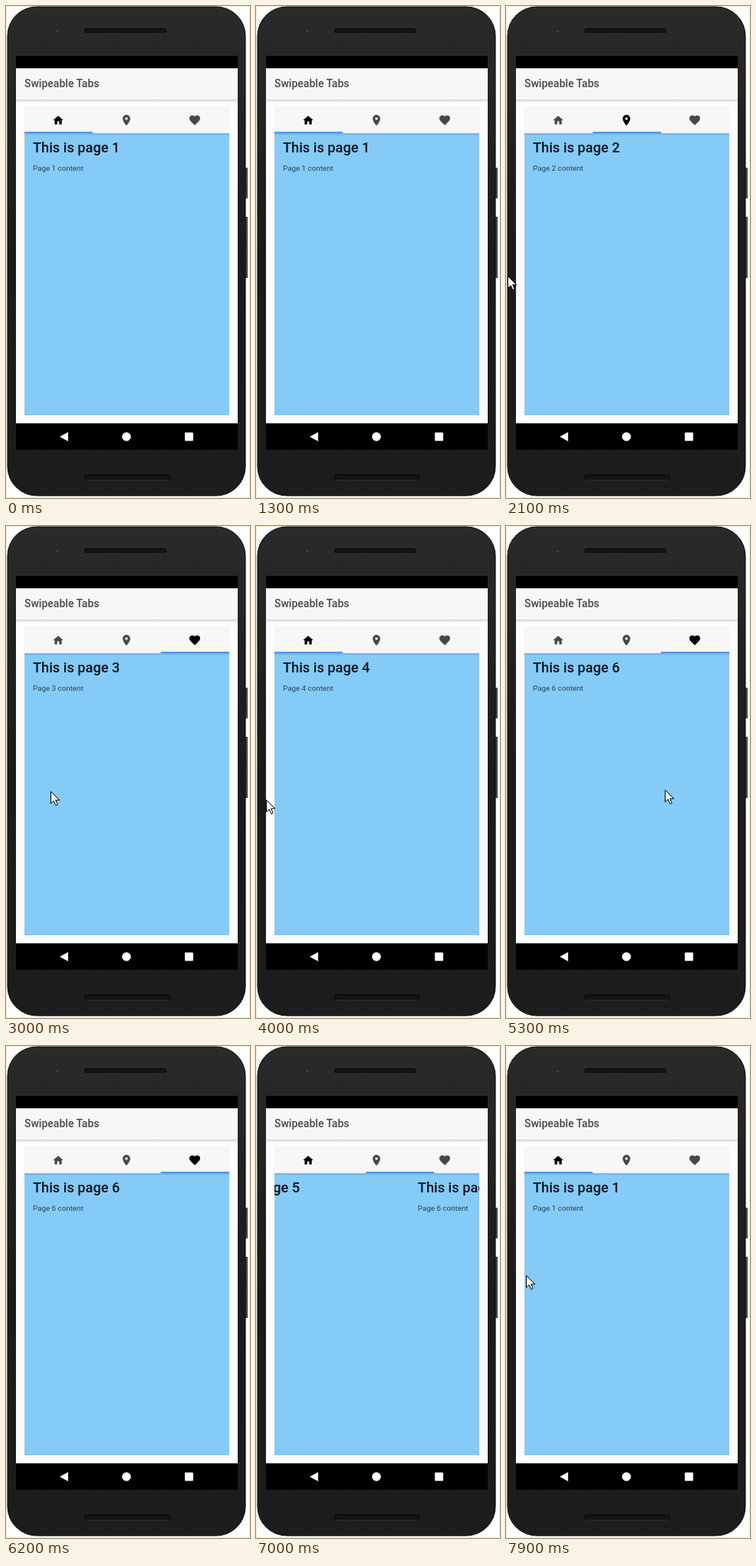
An HTML page for the animation above (8000 ms loop, 318 by 642 pixels).

```html
<!DOCTYPE html>
<html lang="en">
<head>
<meta charset="utf-8">
<title>Swipeable Tabs</title>
<style>
html, body { margin: 0; width: 100%; height: 100%; overflow: hidden; background: #fff; }
svg { display: block; width: 318px; height: 642px; font-family: Roboto, Arial, sans-serif; }
.title { font-size: 14px; font-weight: 500; fill: #484848; }
.head { font-size: 18.2px; font-weight: 500; fill: #0a1218; }
.copy { font-size: 9.8px; fill: #2c4352; }
</style>
</head>
<body>
<svg viewBox="0 0 318 642">
  <defs>
    <linearGradient id="body" x1="0" y1="0" x2="0" y2="1">
      <stop offset="0" stop-color="#2a2a2a"/>
      <stop offset=".5" stop-color="#1b1b1b"/>
      <stop offset="1" stop-color="#1d1d1d"/>
    </linearGradient>
    <linearGradient id="shade" x1="0" y1="0" x2="0" y2="1">
      <stop offset="0" stop-opacity=".17"/>
      <stop offset="1" stop-opacity="0"/>
    </linearGradient>
    <clipPath id="view"><rect x="24" y="166" width="267" height="368"/></clipPath>
  </defs>

  <rect width="318" height="642" fill="#fff"/>
  <rect x=".5" y=".5" width="317" height="641" fill="none" stroke="#ecebcf"/>

  <!-- phone -->
  <g fill="#4a4a4a">
    <rect x="312" y="211" width="3" height="40"/>
    <rect x="312" y="275" width="3" height="80"/>
  </g>
  <rect x="2" y="1" width="310" height="638" rx="38" fill="url(#body)" stroke="#060606"/>
  <circle cx="67" cy="33" r="1.2" fill="#4a4a4a"/>
  <g fill="#141414" stroke="#080808">
    <rect x="102.5" y="29.5" width="106" height="5.5" rx="2.7"/>
    <rect x="102.5" y="611.5" width="111" height="6.5" rx="2.5"/>
  </g>
  <path d="M105 35.8H206M105 618.7H211" stroke="#393939" stroke-width=".8"/>

  <!-- screen -->
  <rect x="13" y="65" width="289" height="514" fill="#000"/>
  <rect x="13" y="81.5" width="289" height="463" fill="#fdfdfd"/>
  <rect x="13" y="81.5" width="289" height="40.5" fill="#f7f7f7"/>
  <rect x="13" y="122" width="289" height="4" fill="url(#shade)"/>
  <text class="title" x="24" y="106">Swipeable Tabs</text>

  <rect x="24" y="131" width="267" height="35" fill="#f7f7f7"/>
  <g id="icons">
    <path transform="translate(60.1 141.2) scale(.66)" d="M10 20v-6h4v6h5v-8h3L12 3 2 12h3v8z"/>
    <path transform="translate(148.6 140.6) scale(.7)" d="M12 2C8.13 2 5 5.13 5 9c0 5.25 7 13 7 13s7-7.75 7-13c0-3.87-3.13-7-7-7zm0 9.5a2.5 2.5 0 010-5 2.5 2.5 0 010 5z"/>
    <path transform="translate(237.6 140.6) scale(.7)" d="M12 21.35l-1.45-1.32C5.4 15.36 2 12.28 2 8.5 2 5.42 4.42 3 7.5 3c1.74 0 3.41.81 4.5 2.09C13.09 3.81 14.76 3 16.5 3 19.58 3 22 5.42 22 8.5c0 3.78-3.4 6.86-8.55 11.54z"/>
  </g>
  <rect x="24" y="166" width="267" height="368" fill="#85cbf7"/>
  <rect x="24" y="166" width="267" height="3" fill="url(#shade)"/>
  <rect id="bar" x="24" y="164" width="89" height="2" fill="#4f97f8"/>
  <g clip-path="url(#view)"><g id="pages"></g></g>

  <!-- navigation -->
  <g fill="#fff">
    <path d="M70 562L81 556V568Z"/>
    <circle cx="157" cy="562" r="5.8"/>
    <rect x="233" y="556.5" width="11" height="11" rx="1"/>
  </g>

  <path id="cursor" d="M.5.5V16.2L4.2 12.7 6.8 18.6 9.2 17.5 6.7 11.8H11.8Z" fill="#fff" stroke="#000"/>
</svg>
<script>
const LOOP = 8000, STEP = 100;
const PAGES = 6, TABS = 3, PAGE_W = 267, TAB_W = 89;
const SLIDE = 400, SWEEP = 450, BACK = 200, REACH = 256;
const $ = id => document.getElementById(id);
const icons = [...$('icons').children];

// when and how high the pointer reaches the left edge after each page change
const swipes = [[2104, 352], [3102, 346], [4023, 357], [4840, 352], [5664, 344], [7945, 299]]
  .map(([edge, y], from) => {
    const to = (from + 1) % PAGES;
    // a longer way leads the pointer by more
    const start = edge - 716 - 64 * Math.abs(to - from);
    return { edge, y, from, to, start };
  });

$('pages').innerHTML = Array.from({ length: PAGES }, (_, i) => {
  const x = 35 + i * PAGE_W;
  return `<text class="head" x="${x}" y="191">This is page ${i + 1}</text>` +
         `<text class="copy" x="${x}" y="215">Page ${i + 1} content</text>`;
}).join('');

const ease = p => p * p * (3 - 2 * p);

function pageAt(t) {
  const swipe = swipes.filter(s => s.start <= t).pop();
  if (!swipe) return { pos: 0, target: 0 };
  const { from, to, start } = swipe;
  const p = ease(Math.min(1, (t - start) / SLIDE));
  return { pos: from + (to - from) * p, target: to };
}

// the bar runs back to the first tab after the last one
function tabAt(pos) {
  const m = pos % TABS, last = TABS - 1;
  return m <= last ? m : last * (TABS - m);
}

// the pointer sweeps to the left edge, darts back and hides
function pointerAt(t) {
  const swipe = swipes.find(s => t >= s.edge - SWEEP && t <= s.edge + BACK);
  if (!swipe) return null;
  const d = t - swipe.edge;
  return { x: REACH * (d < 0 ? -d / SWEEP : d / BACK), y: swipe.y };
}

function draw(t) {
  const { pos, target } = pageAt(t);
  $('pages').setAttribute('transform', `translate(${-pos * PAGE_W} 0)`);
  $('bar').setAttribute('x', 24 + tabAt(pos) * TAB_W);
  icons.forEach((icon, i) => icon.setAttribute('fill', i === target % TABS ? '#000' : '#484848'));

  const point = pointerAt(t);
  $('cursor').style.display = point ? '' : 'none';
  if (point) $('cursor').setAttribute('transform', `translate(${Math.round(point.x)} ${point.y})`);
}

const begin = performance.now();
function tick(now) {
  const t = Math.max(0, now - begin) % LOOP;
  draw(Math.floor(t / STEP) * STEP);
  requestAnimationFrame(tick);
}
draw(0);
requestAnimationFrame(tick);
</script>
</body>
</html>
```
